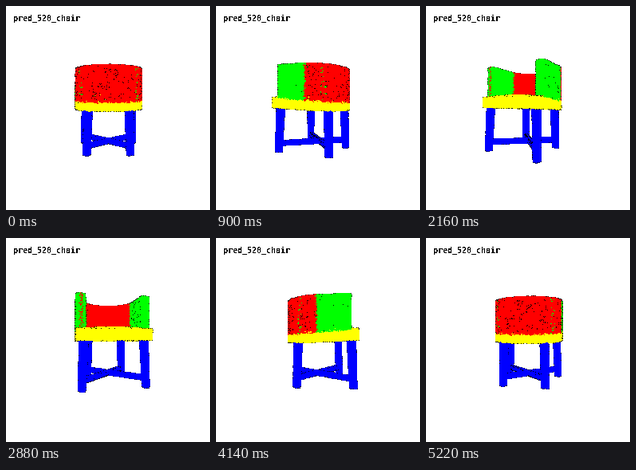
Animation, 256 px wide and 256 px high, one loop 5.4 s. Source, as a matplotlib script:

```python
import numpy as np
import matplotlib.pyplot as plt
from matplotlib.animation import FuncAnimation

SIZE, FRAMES, STEP = 256, 30, 180
CX, CY, DIST, PITCH = 128.2, 128, 220, 0.0325
RED, GREEN, BLUE, YELLOW = (255, 0, 0), (0, 255, 0), (0, 0, 255), (255, 255, 0)
ARM_END, SEAT_END = -29.5, -38

rng = np.random.default_rng(520)
points, colors = [], []


def add(u, y, w, color):
    """Store points: u across, y up, w towards the back of the chair."""
    pos = np.stack(np.broadcast_arrays(u, y, w), axis=1).astype(float)
    points.append(pos + rng.normal(0, 0.1, pos.shape))
    colors.append(np.broadcast_to(np.asarray(color), pos.shape))


def plan(a, b, end, n):
    """Random points on a U: half an ellipse with two straight sides."""
    arc = np.pi / 4 * (a + b)
    s = rng.uniform(-arc + end, arc - end, n)
    ang = np.clip(s / arc, -1, 1) * np.pi / 2
    return a * np.sin(ang), b * np.cos(ang) - np.maximum(abs(s) - arc, 0)


def rim(w):
    return 47.8 - (w - 6) * np.where(w < 6, 0.061, 0.048)


def base(w):
    return 0.3 - w * 0.045


def band(w):
    """Upper limit of the seat on the outer wall."""
    return 9 - (w - 6) * 0.085


def shell_color(w):
    return np.where((w < 6 + rng.normal(0, 0.6, w.size))[:, None], GREEN, RED)


def bar(p, q, e1, e2, r0, r1, n):
    """Surface of a tapering round beam from p to q."""
    p, q, e1, e2 = map(np.array, (p, q, e1, e2))
    t = rng.random((n, 1))
    ang = rng.uniform(0, 2 * np.pi, (n, 1))
    r = r0 + (r1 - r0) * t
    pos = p + (q - p) * t + r * (np.cos(ang) * e1 + np.sin(ang) * e2)
    add(*pos.T, BLUE)


def build_seat_and_back():
    # outer wall, arms denser than the back
    u, w = plan(40, 36.7, ARM_END, 9500)
    y = rng.uniform(band(w), rim(w))
    keep = (w < 6) | (rng.random(w.size) < 0.65)
    color = shell_color(w)
    fleck = (abs(abs(u) - 31) < 2) & (w > 0) & (rng.random(w.size) < 0.12)
    color[fleck] = GREEN
    add(u[keep], y[keep], w[keep], color[keep])

    # seat edge with a ragged upper limit
    u, w = plan(40, 36.7, SEAT_END, 5000)
    y = rng.uniform(base(w), band(w) + rng.normal(0, 0.8, w.size))
    add(u, y, w, YELLOW)

    # inner wall
    u, w = plan(32, 29, ARM_END, 9000)
    add(u, rng.uniform(12, rim(w)), w, shell_color(w))

    # top edge between the walls
    t = rng.random(1600)
    u, w = plan(1, 1, 0, t.size)
    add(u * (32 + 8 * t), rim(w * 33), w * (29 + 7.7 * t), shell_color(w * 33))
    w = rng.uniform(ARM_END, 0, 900)
    u = rng.choice([-1, 1], w.size) * rng.uniform(32, 39.5, w.size)
    add(u, rim(w), w, GREEN)

    # front faces of the arms, one with a mixed strip
    u = rng.choice([-1, 1], 1600) * rng.uniform(31.5, 39.5, 1600)
    mixed = (abs(u - 36) < 2) & (rng.random(u.size) < 0.4)
    add(u, rng.uniform(12, rim(ARM_END), u.size), ARM_END,
        np.where(mixed[:, None], RED, GREEN))

    # seat surface and front edge
    u, w = rng.uniform(-39.5, 39.5, 7000), rng.uniform(SEAT_END, 35, 7000)
    keep = (w < 0) | ((u / 38) ** 2 + (w / 34) ** 2 < 1)
    u, w = u[keep], w[keep]
    add(u, 12.6 + 2 * (1 - (u / 40) ** 2) * (w > -34), w, YELLOW)
    u = rng.uniform(-40, 40, 3200)
    add(u, rng.uniform(base(SEAT_END), 12.6, u.size), SEAT_END, YELLOW)


def build_legs():
    feet = [(-35, -34), (35, -34), (-24, 26.5), (24, 26.5)]
    for u, w in feet:
        bar((u * 0.95, 1, w * 0.95), (u, -50, w),
            (1, 0, 0), (0, 0, 1), 3.9, 3.2, 2600)
    for i, j in ((0, 3), (1, 2)):
        (u0, w0), (u1, w1) = feet[i], feet[j]
        length = np.hypot(u1 - u0, w1 - w0)
        normal = ((w0 - w1) / length * 1.5, 0, (u1 - u0) / length * 1.5)
        bar((u0, -40.5, w0), (u1, -40.5, w1), normal, (0, 2.2, 0), 1, 1, 2200)


build_seat_and_back()
build_legs()
points, colors = np.concatenate(points), np.concatenate(colors).astype(np.uint8)

# each point is a small ball: bright core, black rim lying further back
CORE = [(0, 0), (1, 0), (-1, 0), (0, 1), (0, -1)]
RIM = [(1, 1), (1, -1), (-1, 1), (-1, -1)]


def render(frame):
    angle = 2 * np.pi * frame / FRAMES
    u, y, w = points.T
    x = u * np.cos(angle) + w * np.sin(angle)
    z = w * np.cos(angle) - u * np.sin(angle)
    k = DIST / (DIST - z)
    px = np.rint(CX + k * x).astype(int)
    py = np.rint(CY - k * (y - z * PITCH)).astype(int)

    black = np.zeros_like(colors)
    cells, depth, paint = [], [], []
    for offsets, drop, color in ((CORE, 0, colors), (RIM, 1.7, black)):
        for dx, dy in offsets:
            cells.append((py + dy) * SIZE + px + dx)
            depth.append(z - drop - 0.3 * (dx != 0 or dy != 0))
            paint.append(color)
    order = np.argsort(np.concatenate(depth), kind="stable")
    image = np.full((SIZE * SIZE, 3), 255, np.uint8)
    image[np.concatenate(cells)[order]] = np.concatenate(paint)[order]
    return image.reshape(SIZE, SIZE, 3)


plt.rcParams["text.antialiased"] = False
fig = plt.figure(figsize=(SIZE / 100, SIZE / 100), dpi=100, facecolor="white")
ax = fig.add_axes([0, 0, 1, 1])
ax.axis("off")
picture = ax.imshow(render(0), interpolation="nearest", aspect="auto")
fig.text(9 / SIZE, 1 - 19 / SIZE, "pred_520_chair", family="DejaVu Sans Mono",
         weight="bold", size=7.2, color="black", va="baseline")


def update(frame):
    picture.set_data(render(frame))
    return [picture]


anim = FuncAnimation(fig, update, frames=FRAMES, interval=STEP,
                     repeat=True, repeat_delay=0, blit=False)
plt.show()
```
